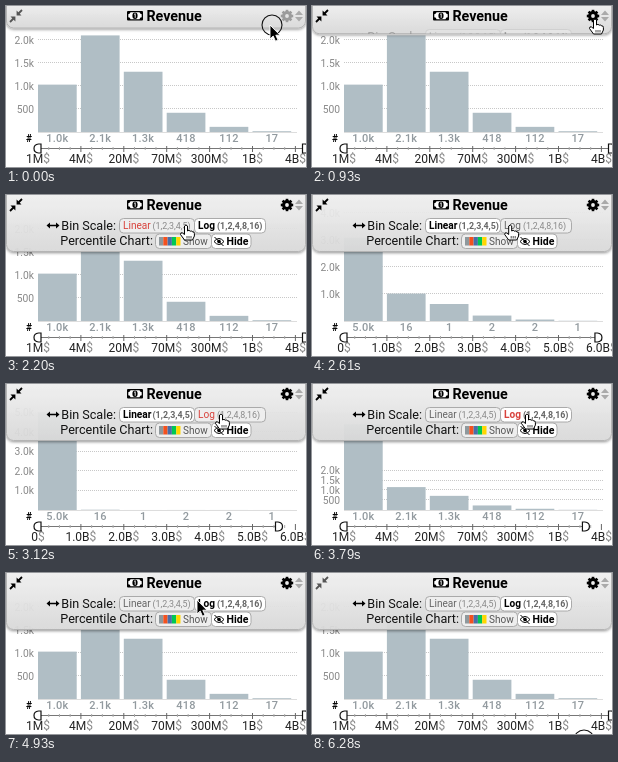
These frames come from a looping animation (300 by 161 pixels, 6380 ms). An HTML page:

```html
<!DOCTYPE html>
<html lang="en">
<head>
<meta charset="utf-8">
<title>Revenue histogram</title>
<style>
html, body { margin: 0; width: 100%; height: 100%; overflow: hidden; background: #fff; }
svg { display: block; width: 300px; height: 161px; font-family: Roboto, Arial, sans-serif; }
</style>
</head>
<body>
<svg id="stage" viewBox="0 0 300 161">
  <defs>
    <linearGradient id="metal" x2="0" y2="1">
      <stop stop-color="#f6f6f6"/><stop offset="1" stop-color="#dcdcdc"/>
    </linearGradient>
    <filter id="shadow" x="-5%" y="-20%" width="110%" height="160%">
      <feDropShadow dx="0" dy="1" stdDeviation="1.5" flood-opacity=".45"/>
    </filter>
    <clipPath id="open"><rect id="openRect" width="300" height="22"/></clipPath>
  </defs>
  <g id="chart"></g>
  <rect id="panel" x=".5" y="-8" width="299" height="30" rx="7" fill="url(#metal)" fill-opacity=".91" stroke="#b4b4b4" filter="url(#shadow)"/>
  <g id="controls" clip-path="url(#open)"></g>
  <g id="header"></g>
  <g id="cursor"></g>
</svg>
<script>
const LOOP = 6380, BASE = 126, LEFT = 32, STEP = 42.9, BAR = 38.7;
const $ = id => document.getElementById(id);

const modes = {
  log: {
    values: [1030, 2100, 1310, 418, 112, 17],
    counts: ['1.0k', '2.1k', '1.3k', '418', '112', '17'],
    edges: ['1M', '4M', '20M', '70M', '300M', '1B', '4B'],
    unit: .046, tick: 500, ticks: 4, handle: 296.5
  },
  linear: {
    values: [5000, 16, 1, 2, 2, 1],
    counts: ['5.0k', '16', '1', '2', '2', '1'],
    edges: ['0', '1.0B', '2.0B', '3.0B', '4.0B', '5.0B', '6.0B'],
    unit: .0195, tick: 1000, ticks: 5, handle: 269.5
  }
};

// time, x, y of the pointer tip
const path = [
  [0, 264, 19], [200, 271, 25], [640, 283, 13], [1510, 283, 13],
  [2140, 180, 30], [2380, 180, 30], [2830, 215, 30], [4080, 215, 30],
  [4190, 214, 28], [4300, 214, 28], [4820, 191, 27], [4940, 191, 27],
  [5460, 272, 24], [5520, 272, 24], [6260, 270, 167], [LOOP, 270, 167]
];

const mix = (a, b, p) => a + (b - a) * p;
const ease = (t, from, to) => {
  const p = Math.min(1, Math.max(0, (t - from) / (to - from)));
  return p * p * (3 - 2 * p);
};
const grey = v => `rgb(${v},${v},${v})`;
const text = (x, y, s, size, fill = '#000', more = '') =>
  `<text x="${x}" y="${y}" font-size="${size}" fill="${fill}" ${more}>${s}</text>`;
const rect = (x, y, w, h, fill, more = '') =>
  `<rect x="${x}" y="${y}" width="${w}" height="${h}" fill="${fill}" ${more}/>`;
const line = (d, color, more = '') => `<path d="${d}" fill="none" stroke="${color}" ${more}/>`;
const middle = 'text-anchor="middle"', end = 'text-anchor="end"', bold = 'font-weight="700"';

function pointerAt(t) {
  const i = path.findIndex(k => k[0] > t);
  const [t0, x0, y0] = path[i - 1], [t1, x1, y1] = path[i];
  const p = ease(t, t0, t1);
  return [mix(x0, x1, p), mix(y0, y1, p)];
}

function drawChart(t) {
  const linear = t >= 2260 && t < 3640;
  const { log, linear: lin } = modes;
  const mode = linear ? lin : log;
  const bars = ease(t, 2260, 2800) - ease(t, 3640, 4120);
  const axis = ease(t, 2260, 2800) - ease(t, 3760, 4440);
  const unit = mix(log.unit, lin.unit, axis);
  const handle = mix(log.handle, lin.handle, ease(t, 2260, 2960) - ease(t, 3720, 4360));
  let s = '';
  for (let i = 1; i <= mode.ticks; i++) {
    const v = i * mode.tick, y = BASE - v * unit;
    s += line(`M32 ${Math.round(y) - .5}H291`, '#c8c8c8', 'stroke-dasharray="1 1"');
    s += text(28, y + 3.5, v < 1000 ? v : (v / 1000).toFixed(1) + 'k', 10.3, '#888', end);
  }
  for (let i = 0; i < 6; i++) {
    const x = LEFT + i * STEP;
    const h = mix(log.values[i] * log.unit, lin.values[i] * lin.unit, bars);
    s += rect(x, BASE - h, BAR, h, '#b0bec5');
    s += text(x + BAR / 2, 136, mode.counts[i], 11, '#929a9f', middle + ' font-weight="500" letter-spacing=".2"');
  }
  s += line('M32 126.5H291', '#ddd') + text(20, 136, '#', 10, '#000', bold);
  s += line('M35 142.5H' + handle, '#777');
  for (let i = 0; i <= 24; i++) {
    const x = LEFT + i * STEP / 4;
    s += i % 4 ? line(`M${x} 141V144`, '#aaa') : line(`M${x} 140V146`, '#666');
  }
  mode.edges.forEach((label, i) => {
    s += text(LEFT + i * STEP, 157, label + '<tspan fill="#888">$</tspan>', 12, '#222', middle);
  });
  const knob = 'stroke-width="1.2" style="fill:#fff"';
  s += line('M35 138H32.5Q28 138.5 28 142.5T32.5 147H35Z', '#111', knob);
  s += line(`M${handle} 138h2.5q4.5 .5 4.5 4.5t-4.5 4.5h-2.5Z`, '#111', knob);
  $('chart').innerHTML = s;
}

function option(x, w, name, detail, detailX, active, hover) {
  const weight = active ? bold : '';
  return rect(x, 23.5, w, 14.5, active ? '#fff' : '#eee', 'rx="4" stroke="#aaa"') +
    text(x + 3.5, 34, name, 10.1, hover ? '#d8433d' : active ? '#000' : '#666', weight) +
    text(detailX, 34, detail, 8.9, active ? '#666' : '#888', weight);
}

function drawControls(t) {
  const linear = t >= 2260 && t < 3620;
  let s = '<path d="M40.5 30.5L44 27.5V29.7H50V27.5L53.5 30.5 50 33.5V31.3H44V33.5Z"/>';
  s += text(110, 35, 'Bin Scale:', 12.6, '#111', end);
  s += option(113.5, 75, 'Linear', '(1,2,3,4,5)', 146.5, linear, t > 2040 && t < 2480);
  s += option(188.5, 71, 'Log', '(1,2,4,8,16)', 211, !linear, t > 2680 && t < 4700);
  s += text(147, 50, 'Percentile Chart:', 12.6, '#111', end);
  s += rect(149.5, 39, 56, 14.5, '#eee', 'rx="4" stroke="#aaa"');
  ['#8f989c', '#f4511e', '#4a6ea8', '#00c853', '#ffd600'].forEach((c, i) => {
    s += rect(153 + i * 4.3, 42, 4.3, 8.5, c);
  });
  s += text(177, 50, 'Show', 10, '#555');
  s += rect(205.5, 39, 39.5, 14.5, '#fff', 'rx="4" stroke="#aaa"');
  s += line('M208 46.5Q213 40.5 218 46.5Q213 52.5 208 46.5', '#000');
  s += '<circle cx="213" cy="46.5" r="1.8"/>' + line('M208.5 42L217.5 51', '#000');
  s += text(220.5, 50, 'Hide', 10.5, '#000', bold);
  $('controls').innerHTML = s;
}

function drawHeader(t) {
  const enter = ease(t, 40, 360);
  const left = grey(Math.round(mix(85, 0, enter - ease(t, 6000, 6270))));
  const gear = grey(Math.round(mix(155, 0, enter)));
  let s = `<path d="M10.6 4.5V9.4H15.5ZM9.4 15.5V10.6H4.5Z" fill="${left}"/>`;
  s += line('M12 8L16 4M8 12L4 16', left, 'stroke-width="1.8"');
  s += rect(121, 5, 16, 9.5, '#000', 'rx="1"');
  s += '<path d="M124.5 6.3H133.5Q133.7 8 135.7 8.2V11.3Q133.7 11.5 133.5 13.2H124.5Q124.3 11.5 122.3 11.3V8.2Q124.3 8 124.5 6.3Z" fill="#fff"/>';
  s += '<ellipse cx="129" cy="9.75" rx="2.6" ry="3.3"/>' + line('M128.2 8.4L129.2 7.7V11.8', '#fff', 'stroke-width=".9"');
  s += text(140.4, 15, 'Revenue', 14.3, '#000', bold);
  s += `<g transform="translate(281 10)"><circle r="3.4" fill="none" stroke="${gear}" stroke-width="3"/>`;
  for (let a = 0; a < 360; a += 45) s += rect(-1.3, -6.2, 2.6, 2.5, gear, `transform="rotate(${a})"`);
  s += '</g><path d="M289 9L293 4.5 297 9ZM289 11H297L293 15.5Z" fill="#aaa"/>';
  $('header').innerHTML = s;
}

function drawCursor(t) {
  const [x, y] = pointerAt(t);
  const hand = (t > 500 && t < 1600) || (t > 1980 && t < 4130);
  const halo = t < 60 || y > 58;
  let s = halo ? '<circle cx="2" cy="0" r="10" fill="none" stroke="#111" stroke-width="1.1"/>' : '';
  s += hand
    ? '<path d="M-1.5 1Q0-1 1.5 1V6Q3 4.5 4.3 6.2 5.8 5.2 6.6 7 8.4 6.4 8.4 8.5V11L6.5 15H-1.5L-5.5 9.5Q-5.5 7-3.5 8L-1.5 9.5Z" fill="#fff" stroke="#000"/>' +
      line('M1 11V13.5M3 11V13.5M5 11V13.5', '#000', 'stroke-width=".7"')
    : '<path d="M0 0V14L3.2 11 5.5 16.2 8 15 5.8 10.2H10Z" stroke="#fff" stroke-width=".9"/>';
  $('cursor').setAttribute('transform', `translate(${x} ${y})`);
  $('cursor').innerHTML = s;
}

const start = performance.now();

function frame() {
  const t = (performance.now() - start) % LOOP;
  const bottom = mix(22, 56.5, ease(t, 820, 1250));
  $('panel').setAttribute('height', bottom + 8);
  $('openRect').setAttribute('height', bottom);
  $('controls').setAttribute('opacity', ease(t, 820, 1150));
  drawChart(t);
  drawControls(t);
  drawHeader(t);
  drawCursor(t);
  requestAnimationFrame(frame);
}
frame();
</script>
</body>
</html>
```
